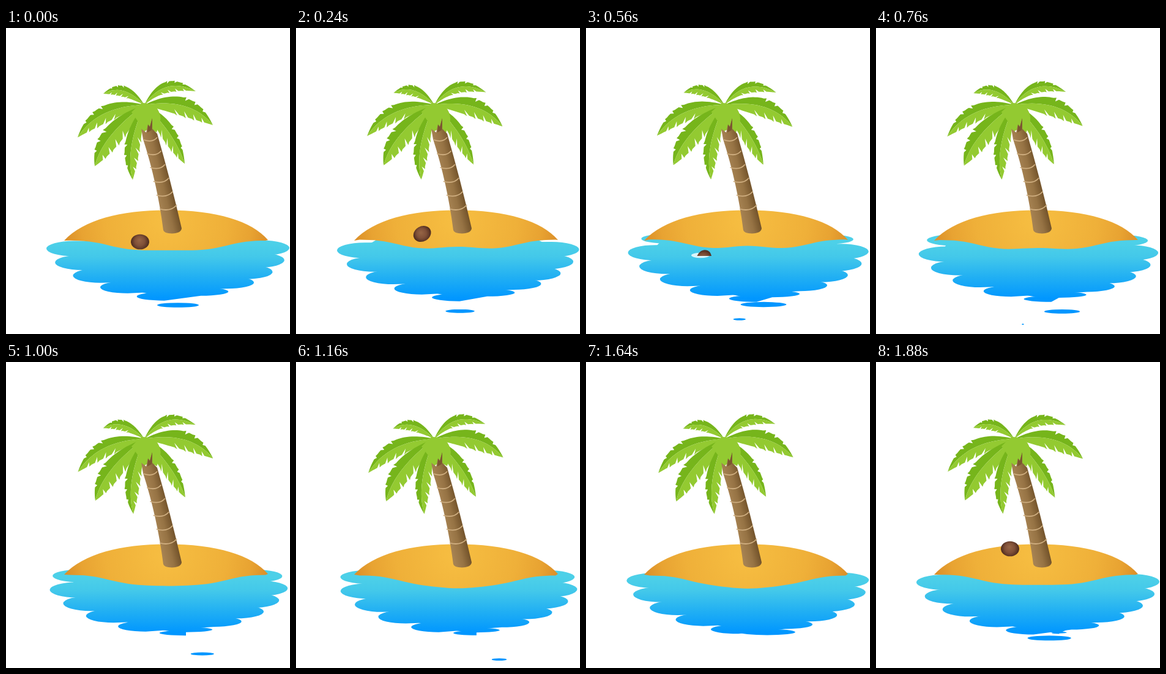
Animation, 464 px wide and 498 px high, one loop 1.92 s. Source, as an HTML page with a canvas:

```html
<!DOCTYPE html>
<html lang="en">
<head>
<meta charset="utf-8">
<title>Palm island</title>
<style>
html, body { margin: 0; width: 100%; height: 100%; overflow: hidden; background: #fff; }
canvas { display: block; }
</style>
</head>
<body>
<canvas id="stage" width="464" height="498"></canvas>
<script>
const ctx = document.getElementById('stage').getContext('2d');
const LOOP = 1920, STEP = 40;

const mix = (a, b, k) => a + (b - a) * k;
const mixPt = (p, q, k) => [mix(p[0], q[0], k), mix(p[1], q[1], k)];
const quad = (a, c, b, k) => mixPt(mixPt(a, c, k), mixPt(c, b, k), k);

// One slow swing per loop drives both the leaves and the tide.
const swing = t => -Math.cos((t - 450) / LOOP * 2 * Math.PI);

function gradient(g, ...stops) {
  stops.forEach(([k, color]) => g.addColorStop(k, color));
  return g;
}
const waterFill = gradient(ctx.createLinearGradient(0, 350, 0, 441),
  [0, '#4dd0e8'], [.25, '#43c8ea'], [.6, '#22b0f3'], [1, '#0096ff']);
const sandFill = gradient(ctx.createRadialGradient(262, 312, 10, 262, 312, 172),
  [0, '#f6bd41'], [.55, '#efb039'], [.8, '#e8a332'], [1, '#d98c27']);
const barkFill = gradient(ctx.createLinearGradient(241, 250, 270, 243),
  [0, '#a68252'], [.45, '#967344'], [1, '#6b4c25']);
const nutFill = gradient(ctx.createRadialGradient(-1, -3, 1, 0, 0, 15),
  [0, '#946344'], [.5, '#805038'], [1, '#4a291d']);

function fillPath(d, color) {
  ctx.fillStyle = color;
  ctx.fill(new Path2D(d));
}
function fillPoly(points, color) {
  fillPath('M' + points.join('L') + 'Z', color);
}
function ellipse(x, y, rx, ry, color) {
  ctx.beginPath();
  ctx.ellipse(x, y, rx, ry, 0, 0, 7);
  ctx.fillStyle = color;
  ctx.fill();
}

// Water bands sink and narrow; each takes the next one's place every loop.
function waterBand(u) {
  const early = u < 0 ? u * u : 0, cube = u ** 3;
  const xl = 66 + 6.5 * u + 7.6 * u * u + 50 * early;
  const xr = 463 - 2.5 * u - 5.6 * u * u - 50 * early;
  const yl = Math.min(441, 359 + 22.8 * u - .208 * cube);
  const yr = 358 + 20 * u - .14 * cube;
  const r = Math.max(1.5, 12.5 - 9 * early - .09 * cube);
  const w = Math.min(45, Math.max(8, (xr - xl) / 2));
  ctx.beginPath();
  ctx.ellipse(xl + w, yl, w, r, 0, Math.PI / 2, Math.PI * 1.5);
  ctx.ellipse(xr - w, yr, w, r, 0, -Math.PI / 2, Math.PI / 2);
  ctx.fillStyle = waterFill;
  ctx.fill();
  return [[xl + w * .8, yl], [xr - w * .8, yr]];
}

function drop(x, y, rx) {
  if (rx > 0) ellipse(x, y, rx, .8 + rx * .09, waterFill);
}

function water(t) {
  const left = [], right = [];
  for (let k = -1; k < 5; k++) {
    const [l, r] = waterBand(k + t / LOOP);
    left.push(l);
    right.unshift(r);
  }
  fillPoly([...left, ...right], waterFill);
  const a = t > 1500 ? t - LOOP : t;
  drop(281 - .054 * a, 451 + .041 * a, 34 - .0425 * a);
  const b = t - 560;
  if (b > -320) drop(290 + .07 * b, 450 + .057 * b, 37.5 - .042 * b);
}

// Shoreline: a broad dip whose middle rises and falls with the tide.
function shoreY(x, t) {
  const dip = 16.5 * Math.exp(-(((x - 265) / 105) ** 4));
  const tide = 2 + 6.5 * Math.exp(-(((x - 265) / 45) ** 2));
  return 346 + dip + tide * swing(t);
}

function island(t) {
  let d = `M95 346C127 312 187 296.500 262 296.500C345 296.500 401 314 428 345`;
  for (let x = 424; x > 96; x -= 8) d += `L${x} ${shoreY(x, t)}`;
  fillPath(d + 'Z', sandFill);
}

function nut(x, y, turn, size = 1) {
  ctx.save();
  ctx.translate(x, y);
  ctx.rotate(turn);
  ctx.scale(size, size);
  ellipse(0, 0, 15, 12.3, nutFill);
  ctx.restore();
}

// Falls from the leaves, bounces off the sand and sinks.
function coconut(t) {
  const fall = t - 1632;
  if (fall > 0) nut(219, 176 + .00208 * fall * fall, 0, Math.min(1, fall / 120));
  if (t > 760) return;
  if (t > 470) {
    ctx.globalAlpha = Math.min(1, (760 - t) / 160) * .8;
    ellipse(187, 370, Math.min(15, (t - 440) / 8), 4.2, '#fff');
    ctx.globalAlpha = 1;
  }
  ctx.save();
  ctx.beginPath();
  ctx.rect(0, 0, 464, t > 400 ? 371 : 498);
  ctx.clip();
  nut(219 - .0583 * t + .00002 * t * t, 348 - .132 * t + .000325 * t * t, -.0022 * t);
  ctx.restore();
}

// Half a leaf between its rib and one edge, with slits cut towards the rib.
function halfLeaf(hub, rib, tip, base, ctrl, slits, depth, color) {
  const edge = k => quad(base, ctrl, tip, k);
  const spine = k => quad(hub, rib, tip, k);
  const points = [];
  for (let k = 0; k < 1; k += .05) points.push(spine(k));
  let k = 1;
  for (let i = 0; i < slits; i++) {
    const s = .83 - i * .145;
    for (; k > s; k -= .03) points.push(edge(k));
    points.push(edge(s), mixPt(edge(s - .03), spine(s - .08), depth),
      mixPt(edge(s - .04), spine(s - .04), -.12));
    k = s - .08;
  }
  for (; k > 0; k -= .03) points.push(edge(k));
  fillPoly([...points, base, hub], color);
}

const hub = [226, 125];
function frond([tip, outer, inner]) {
  const rib = mixPt(outer, inner, .43);
  halfLeaf(hub, rib, tip, mixPt(hub, outer, .05), outer, 3, .35, '#76b51b');
  halfLeaf(hub, rib, tip, mixPt(hub, inner, .2), inner, 4, .5, '#93ca31');
}

// Tip, then the bend of the dark and of the light edge.
const fronds = [
  [[159, 107], [193, 74], [188, 108]],
  [[310, 103], [258, 62], [262, 98]],
  [[117, 178], [142, 106], [160, 155]],
  [[338, 158], [305, 88], [298, 146]],
  [[145, 225], [136, 158], [185, 197]],
  [[207, 247], [174, 192], [219, 208]],
  [[292, 221], [286, 150], [262, 198]]
];

function crown(t) {
  ctx.save();
  ctx.translate(225, 130);
  ctx.rotate(-.029 * (swing(t) + .1));
  ctx.translate(-225, -130);
  fronds.forEach(frond);
  fillPath('M205 137Q215 127 222 122Q234 121 247 131Q254 142 252 152L246 170Q232 160 224 171L217 154Z', '#93ca31');
  ctx.restore();
}

function trunk() {
  fillPath('M221 164L229 170L232 157L235 161L239 147L239 164L247 172Q269 248 287 326' +
    'Q286 334 271 334.500Q258 334 257 329Q247 252 224 181Z', barkFill);
  fillPath('M231 170L232 157L235 161L239 147L238 166Z', '#7a5630');
  ctx.strokeStyle = '#cfae80';
  ctx.lineWidth = 1.8;
  for (let i = 0; i < 6; i++) {
    const x = 225 + 5.2 * i, y = 182 + 22.5 * i, w = 22 + 1.2 * i;
    ctx.stroke(new Path2D(`M${x} ${y}q${w / 2 + 4} 5 ${w} ${-4 - i / 2}`));
  }
}

function draw(now) {
  const t = Math.floor(now % LOOP / STEP) * STEP;
  ctx.clearRect(0, 0, 464, 498);
  water(t);
  island(t);
  coconut(t);
  crown(t);
  trunk();
}

let start;
function tick(now) {
  start ??= now;
  draw(now - start);
  requestAnimationFrame(tick);
}
draw(0);
requestAnimationFrame(tick);
</script>
</body>
</html>
```
